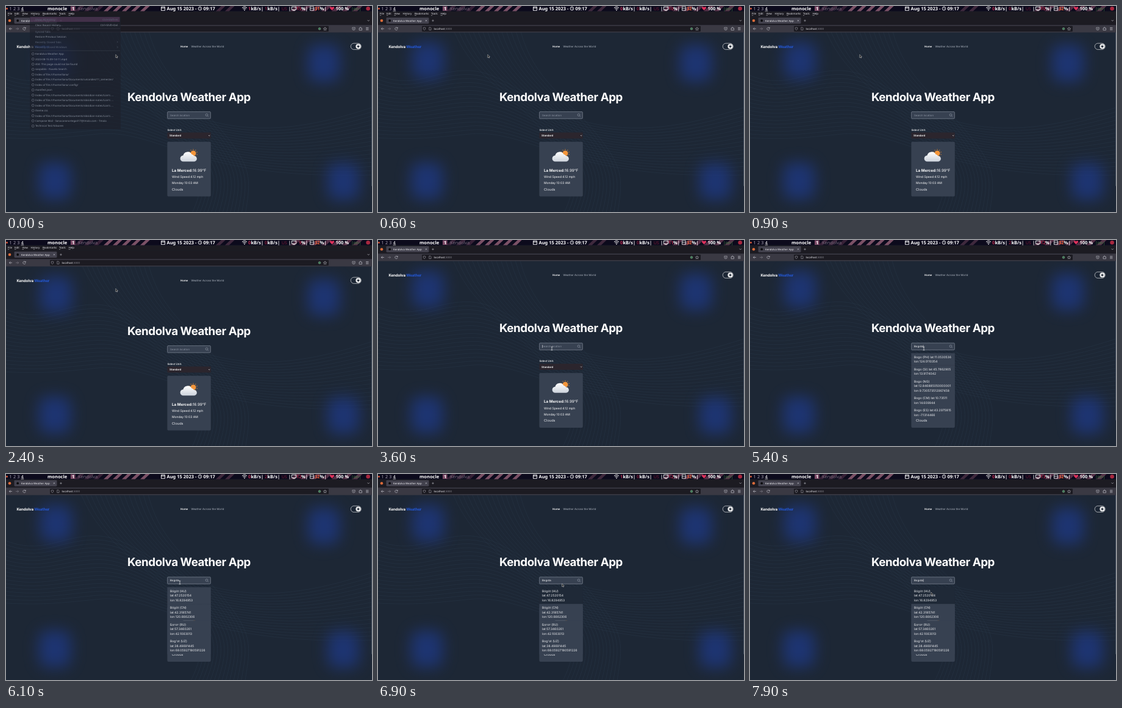
These frames come from a looping animation (600 px wide and 338 px high, 8000 ms). An HTML page:

```html
<!DOCTYPE html>
<html lang="en">
<head>
<meta charset="utf-8">
<title>Weather app demo</title>
<style>
html, body { margin: 0; width: 100%; height: 100%; overflow: hidden; background: #1d2735; }
svg { display: block; width: 100vw; height: 100vh; }
text { white-space: pre; text-rendering: geometricPrecision; }
.inter { font-family: Inter, sans-serif; }
.noto { font-family: "Noto Sans", sans-serif; }
</style>
</head>
<body>
<svg id="stage" viewBox="0 0 600 338"></svg>
<script>
const LOOP = 8000;
const BRAND = 'Kendolva';
const CARD = '#374151';
const stage = document.getElementById('stage');

const range = (n, f) => Array.from({ length: n }, (_, i) => f(i)).join('');
const rect = (x, y, w, h, fill, more = '') =>
  `<rect x="${x}" y="${y}" width="${w}" height="${h}" fill="${fill}" ${more}/>`;
const circle = (x, y, r, fill, more = '') =>
  `<circle cx="${x}" cy="${y}" r="${r}" fill="${fill}" ${more}/>`;
const line = (d, color, width = 0.6, more = '') =>
  `<path d="${d}" fill="none" stroke="${color}" stroke-width="${width}" ${more}/>`;
const text = (x, y, s, size, fill = '#fff', more = '', font = 'inter') =>
  `<text class="${font}" x="${x}" y="${y}" font-size="${size}" fill="${fill}" ${more}>${s}</text>`;
const noto = (x, y, s, size, fill, more) => text(x, y, s, size, fill, more, 'noto');
const bold = 'font-weight="700"';
const semi = 'font-weight="600"';

function waves() {
  const across = range(17, i =>
    line(`M-5 ${112 + i * 6.5}C60 ${140 + i * 5} 90 ${104 + i * 7} 150 ${106 + i * 6.5}` +
      `S260 ${170 + i * 4} 340 ${190 + i * 4}S500 ${200 + i * 5} 605 ${165 + i * 7}`, '#3b5064', 0.4));
  const down = range(15, i =>
    line(`M${118 + i * 8} 25C${150 + i * 7} 115 ${215 + i * 6} 140 ${270 + i * 6} 205` +
      `S${330 + i * 5} 290 ${300 + i * 6.5} 350`, '#3b5064', 0.4));
  return `<g opacity=".5">${across}${down}</g>`;
}

const blob = (x, y) => rect(x - 26, y - 30, 52, 60, '#1e3a8a', 'rx="14" filter="url(#blur)" opacity=".72"');

function topBar() {
  const stripes = (from, to, step, color, op) =>
    range(Math.floor((to - from) / step), i => {
      const x = from + i * step;
      return `<path d="M${x} 8.6l9-8.6h${step * 0.45}l-9 8.6z" fill="${color}" opacity="${op}"/>`;
    });
  const stat = (x, s, fill = '#fff', id = '') => noto(x, 6.7, s, 7.5, fill, `${bold} ${id && `id="${id}"`}`);
  return rect(0, 0, 600, 8.6, '#0c0a1c') +
    stripes(112, 160, 16, '#6d3d58', 0.45) +
    stripes(160, 238, 15, '#b7788f', 0.65) +
    stripes(344, 374, 15, '#8d5870', 0.4) +
    stripes(466, 590, 17, '#9c5672', 0.5) +
    range(4, i => noto(5.5 + i * 6.4, 6.7, i + 1, 7.2, i === 3 ? '#fff' : '#a9a3b3')) +
    rect(24.6, 7.6, 4.6, 0.8, '#fff') +
    circle(1.5, 4.2, 1.5, '#d4583a') +
    stat(68, 'monocle') +
    rect(106, 0.6, 7.5, 7.4, '#7c4a66') + stat(108, '1') +
    noto(118, 6.7, BRAND, 7.4, '#77697c') +
    rect(254.5, 1.8, 6, 5.4, 'none', 'stroke="#fff" stroke-width=".9"') +
    line('M254.5 3.4h6M256 .8v1.4M259 .8v1.4', '#fff', 0.8) +
    stat(263.5, 'Aug 15 2023 -') +
    circle(318, 4.2, 2.8, 'none', 'stroke="#fff" stroke-width=".9"') +
    line('M318 2.5v1.8l1.3.8', '#fff', 0.7) +
    stat(323.5, '09:17') +
    line('M387 3.2q4-3.4 8 0M388.6 4.9q2.4-2 4.8 0', '#fff', 1) + circle(391, 6.6, 0.9, '#fff') +
    stat(397, '0', '#b0284c', 'up') + stat(401.4, 'kB/s|') +
    stat(424, '0', '#7d1f3a', 'down') + stat(428.4, 'kB/s|') +
    noto(452, 6.5, 'US', 6.8, '#7a1c38') + stat(463, '|') +
    rect(468.5, 1.5, 7, 4.6, 'none', 'stroke="#fff" stroke-width=".9"') + line('M470 7.4h4', '#fff', 0.8) +
    stat(476, '10', '#a72a48', 'cpu') + stat(484, '%|') +
    rect(498.5, 1.2, 6, 6, 'none', 'stroke="#fff" stroke-width=".8"') + line('M498.5 4.2h6', '#fff', 0.8) +
    stat(506, '32', '#f0663f', 'mem') + stat(514.5, '%|') +
    `<path d="M534.5 7.3l-3.4-3.5q-.6-2.3 1.5-2.5 1.3 0 1.9 1.3.6-1.3 1.9-1.3 2.1.2 1.5 2.5z" fill="#e0315c"/>` +
    stat(540.5, '100 %') + noto(566, 6.6, '|on|', 7, '#3f8a45') +
    circle(593.6, 4.3, 3.3, '#a8283f');
}

function menuBar() {
  const item = (x, a, key, b) =>
    noto(x, 14.4, `${a}<tspan text-decoration="underline">${key}</tspan>${b}`, 4.35, '#e8e8ee');
  return rect(0, 8.6, 600, 9, '#1c1b22') +
    item(3, '', 'F', 'ile') + item(14, '', 'E', 'dit') + item(26.5, '', 'V', 'iew') +
    item(40.5, 'Hi', 's', 'tory') + item(60, '', 'B', 'ookmarks') +
    item(87, '', 'T', 'ools') + item(102.5, '', 'H', 'elp');
}

function browser() {
  const ink = '#d6d6de';
  return rect(0, 17.4, 600, 14, '#1c1b22') +
    circle(6, 24, 2.3, '#d96b3a') +
    rect(13.5, 19, 70, 10, '#42414d', 'rx="1.4"') +
    circle(19.2, 24, 1.9, '#0b0b0d') +
    noto(25, 25.6, `${BRAND} Weather App`, 4.35, '#f4f4f8') +
    line('M77.6 22.7l2.6 2.6m0-2.6l-2.6 2.6', ink, 0.5) +
    line('M88.3 24h3.4M90 22.3v3.4', ink, 0.5) +
    line('M592.5 23l1.7 1.7 1.7-1.7', ink) +
    rect(0, 31.2, 600, 12.2, '#3a3943') +
    line('M10 37.3h-4.6m2-2l-2 2 2 2', ink) +
    line('M16 37.3h4.6m-2-2l2 2-2 2', '#85848e') +
    line('M32 36.3a2.2 2.2 0 1 0 .1 1.8M32.2 34.8v1.7h-1.7', ink) +
    rect(72, 32.7, 457, 9.2, '#1c1b22', 'rx="1.3"') +
    line('M76 35l1.9.7q0 3-1.9 4-1.9-1-1.9-4z', '#b9b9c2', 0.5) +
    line('M83.8 35h2.2l1 1v3.4h-3.2z', '#b9b9c2', 0.5) +
    noto(91.5, 38.8, 'localhost<tspan fill="#92919b">:3000</tspan>', 4.35, '#f4f4f8') +
    circle(514, 37.3, 1.9, '#3f7d57', 'stroke="#9fb3a8" stroke-width=".4"') +
    line('M523 34.8l.8 1.7 1.8.2-1.3 1.3.3 1.8-1.6-.9-1.6.9.3-1.8-1.3-1.3 1.8-.2z', ink, 0.5) +
    line('M567.8 35.2h4.4v2.2a2.2 2.2 0 0 1-4.4 0zM568.9 36.8l1.1 1 1.1-1', ink, 0.5) +
    line('M579 36.4h1.2q-.3-1.6.9-1.6t.9 1.6h1.4v3.2H579z', ink) +
    line('M590 35.5h4.4M590 37.3h4.4M590 39.1h4.4', ink);
}

function nav() {
  const rays = range(8, i => {
    const a = i * Math.PI / 4, c = Math.cos(a), s = Math.sin(a);
    return line(`M${577.5 + c * 1.8} ${66.3 + s * 1.8}L${577.5 + c * 2.8} ${66.3 + s * 2.8}`, '#1d2735', 0.7);
  });
  return text(17.4, 68.5, `${BRAND} <tspan fill="#2459d8">Weather</tspan>`, 6.25, '#fff', `${bold} letter-spacing="-.156"`) +
    text(286, 67.9, 'Home', 4.375, '#fff', semi) +
    text(303.4, 67.9, 'Weather Across the World', 4.375, '#b3bac5') +
    rect(565.2, 61.2, 17, 10.2, 'none', 'rx="5.1" stroke="#fff" stroke-width=".6"') +
    circle(577.5, 66.3, 4.1, '#fff') + circle(577.5, 66.3, 1.6, '#1d2735') + rays;
}

function weatherIcon() {
  const rays = range(10, i =>
    `<path d="M306.1 235.9l.9-1.5.9 1.5z" fill="#e8892f" transform="rotate(${i * 36} 307 241.8)"/>`);
  return rays + circle(307, 241.8, 4.5, '#f3953a') +
    `<path d="M290.8 255.2a5 5 0 0 1-.4-10 7.6 7.6 0 0 1 14.2-1.6 4.7 4.7 0 0 1 3.6 2.4 4.6 4.6 0 0 1 .2 9.2z" fill="url(#cloud)"/>`;
}

function content() {
  return text(300, 155.6, `${BRAND} Weather App`, 18.75, '#fff',
      `${bold} letter-spacing="-.44" text-anchor="middle"`) +
    rect(264.6, 173.5, 70.8, 11.4, CARD, 'rx="1.3" stroke="#8b94a2" stroke-width=".6"') +
    text(269, 180.7, 'Search location', 4.375, '#8c95a3', 'id="hint"') +
    text(269, 180.7, '', 4.375, '#fff', 'id="query"') +
    rect(0, 176.6, 0.45, 5, '#fff', 'id="caret"') +
    circle(329, 178.7, 1.9, 'none', 'stroke="#a5adba" stroke-width=".5"') +
    line('M330.4 180.1l1.6 1.6', '#a5adba', 0.5) +
    text(264.4, 204.9, 'Select Unit:', 4.375, '#fff', 'font-weight="500"') +
    rect(264.4, 207.6, 71.4, 10, '#2b252d', 'rx="1"') +
    text(268, 214.2, 'Standard', 4.375, '#fff', semi) +
    line('M332 212l1.2 1.2 1.2-1.2', '#fff') +
    rect(264.4, 222.8, 71.4, 89.8, CARD, 'rx="2"') + weatherIcon() +
    text(272, 271.5, '<tspan font-weight="700">La Merced:</tspan>16.99°F', 6.25) +
    text(272, 282, 'Wind Speed:4.12 mph', 5) +
    text(272, 292, 'Monday 10:03 AM', 5) +
    text(272, 302.7, 'Clouds', 5.625, '#e8ebef');
}

function results(id, places) {
  let y = 185.7, out = '';
  for (const place of places) {
    const rows = place.split('|'), h = 5 + rows.length * 7.5;
    out += rect(264.4, y, 71.4, h + 0.1, CARD);
    rows.forEach((s, i) => out += text(269, y + 8.1 + i * 7.5, s, 5, '#f3f4f6', 'letter-spacing=".05"'));
    y += h;
  }
  return `<g id="${id}">${out}</g>`;
}

function historyMenu() {
  const file = s => `Index of file:///home/liana/${s}`;
  const notes = file("Documents/obsidian-notes/Lian's ...");
  const top = ['Show All History', 'Clear Recent History...', 'Synced Tabs', 'Restore Previous Session',
    'Recently Closed Tabs', 'Recently Closed Windows'];
  const pages = [`${BRAND} Weather App`, '2023-08-15 09-14-11.mp4', '404: This page could not be found',
    'saopablo - Nuvelo Search', file(''), file('Documents/uniandes/11_semester/'), file('.config/'),
    'manifest.json', notes, notes, notes, 'theme.css', notes,
    'Compose Mail - lianacaronortega417@tmola.com - Tmola', 'Technical Test Nilvaren'];
  const ink = '#8a919e', dim = '#5d6577';
  return '<g id="history">' + rect(39, 17.4, 149, 184.6, '#1e222d', 'opacity=".72"') +
    rect(39.5, 18, 147, 8, '#5d3c5f', 'opacity=".6"') +
    top.map((s, i) => noto(48, (i < 2 ? 24 : 26.6) + i * 8.5, s, 4.35, i === 1 || i === 3 ? ink : dim)).join('') +
    noto(183, 24, 'Ctrl+Shift+H', 4.35, dim, 'text-anchor="end"') +
    noto(183, 32.5, 'Ctrl+Shift+Del', 4.35, ink, 'text-anchor="end"') +
    line('M40 37h147M40 73.3h147', '#4a4f5c', 0.4) +
    line('M182 57.7l1.3 1.3-1.3 1.3M182 66.2l1.3 1.3-1.3 1.3', dim, 0.5) +
    pages.map((s, i) => circle(44.2, 78.6 + i * 8.45, 1.9, 'none', `stroke="${ink}" stroke-width=".5"`) +
      noto(48, 80.1 + i * 8.45, s, 4.35, ink)).join('') + '</g>';
}

stage.innerHTML = `<defs>
  <filter id="blur" x="-90%" y="-90%" width="280%" height="280%" color-interpolation-filters="sRGB"><feGaussianBlur stdDeviation="12"/></filter>
  <linearGradient id="cloud" x2="0" y2="1"><stop stop-color="#fff"/><stop offset="1" stop-color="#ccd2db"/></linearGradient>
  </defs>` +
  rect(0, 0, 600, 338, '#1d2735') +
  `<g class="mid">${waves()}</g>` +
  `<g class="head">${blob(82, 90)}${blob(521, 94)}</g>` + blob(80, 287) + blob(553, 288) +
  `<g class="mid">${content()}</g>` +
  results('short', ['Bogo (PH) lat:11.0530536|lon:124.0110354', 'Bogo (SI) lat:45.7862905|lon:13.9174042',
    'Bogo (NG)|lat:12.846885050000001|lon:9.730573512967458', 'Bogo (CM) lat:10.73511|lon:14.609944',
    'Bogo (ES) lat:43.2975815|lon:-7.1314466']) +
  results('full', ['Bogotá (CO)|lat:4.6533817|lon:-74.0836331', 'Bogota (US)|lat:40.8762103|lon:-74.0298623',
    'Bogota (US)|lat:36.1639593|lon:-89.4381327', 'Bogota (PH)|lat:11.0530536|lon:124.0110354',
    'Bogota (PE)|lat:-9.4571021|lon:-77.5312204']) +
  results('final', ['Bögöt (HU)|lat:47.2520154|lon:16.8294953', 'Bögöt (CN)|lat:42.3185741|lon:120.6662306',
    'Богот (RU)|lat:57.3460261|lon:42.1063013', "Bog'ot (UZ)|lat:38.49691445|lon:68.05927180591226"]) +
  `<g class="head">${nav()}${browser()}</g><g id="menu">${menuBar()}</g>` +
  rect(599, 43.4, 1, 252, '#465060', 'id="thumb"') +
  topBar() + historyMenu() +
  '<path id="arrow" d="M0 0v5l1.2-1 .8 1.7.9-.4-.8-1.6 1.5-.1z" fill="#111" stroke="#fff" stroke-width=".45"/>' +
  line('M-1.3-2.8q1.3 0 1.3 .8q0-.8 1.3-.8M0-2v4.2M-1.3 3q1.3 0 1.3-.8q0 .8 1.3 .8', '#fff', 0.6, 'id="beam"');

const $ = id => document.getElementById(id);
const show = (id, on) => $(id).setAttribute('visibility', on ? 'visible' : 'hidden');
const move = (el, x, y) => el.setAttribute('transform', `translate(${x} ${y})`);
const mids = document.querySelectorAll('.mid');
const heads = document.querySelectorAll('.head');
const hoverBox = $('final').querySelector('rect');

// time, upload, download, processor, memory
const stats = [[0, 1, 1, 15, 31], [500, 0, 0, 10, 32], [1500, 0, 0, '\u20079', 32], [3400, 0, 0, 11, 32],
  [4400, 0, 1, 11, 32], [5400, 0, 2, 12, 32], [6400, 1, 0, 12, 32], [7400, 0, 0, 13, 32]];
const pointer = [[0, 179.8, 79.7], [2500, 179.8, 79.7], [3250, 285, 178], [6250, 285, 178],
  [6600, 300, 193], [6900, 301.6, 179.8], [7300, 301.6, 179.8], [7700, 296.8, 194], [LOOP, 296.8, 194]];
const COMPACT = 3400, TYPE = 4600;

function pointerAt(t) {
  const i = pointer.findIndex(p => p[0] > t);
  const [t0, x0, y0] = pointer[i - 1], [t1, x1, y1] = pointer[i];
  const k = (t - t0) / (t1 - t0), e = k * k * (3 - 2 * k);
  return [x0 + (x1 - x0) * e, y0 + (y1 - y0) * e];
}

function caretOn(t) {
  if (t < COMPACT) return false;
  if (t < TYPE) return (t - COMPACT) % 1000 < 500;
  return t < 5390 || (t - 5390) % 1005 < 503;
}

function draw(t) {
  const compact = t >= COMPACT;
  heads.forEach(g => move(g, 0, compact ? -8.8 : 0));
  mids.forEach(g => move(g, 0, compact ? -4.5 : 0));
  show('menu', !compact);
  $('thumb').setAttribute('y', compact ? 34.6 : 43.4);
  $('thumb').setAttribute('height', compact ? 261 : 252);
  $('history').setAttribute('opacity', Math.max(0, 1 - t / 300));

  const now = stats.filter(s => s[0] <= t).pop();
  ['up', 'down', 'cpu', 'mem'].forEach((id, i) => $(id).textContent = now[i + 1]);

  const typed = Math.max(0, Math.min(6, Math.floor((t - TYPE) / 100) + 1));
  const query = $('query');
  query.textContent = 'Bogota'.slice(0, typed);
  show('hint', !typed);
  show('caret', caretOn(t));
  $('caret').setAttribute('x', 269.2 + (typed ? query.getComputedTextLength() : 0));

  show('short', t >= 5400 && t < 5500);
  show('full', t >= 5500 && t < 5700);
  show('final', t >= 5700);
  hoverBox.setAttribute('fill', t >= 6450 ? '#1f2937' : CARD);

  const [x, y] = pointerAt(t), overField = t >= 3200 && t < 6350;
  move($('arrow'), x, y);
  move($('beam'), x, y);
  show('arrow', !overField);
  show('beam', overField);
}

const start = performance.now();
function tick() {
  draw((performance.now() - start) % LOOP);
  requestAnimationFrame(tick);
}
tick();
</script>
</body>
</html>
```
